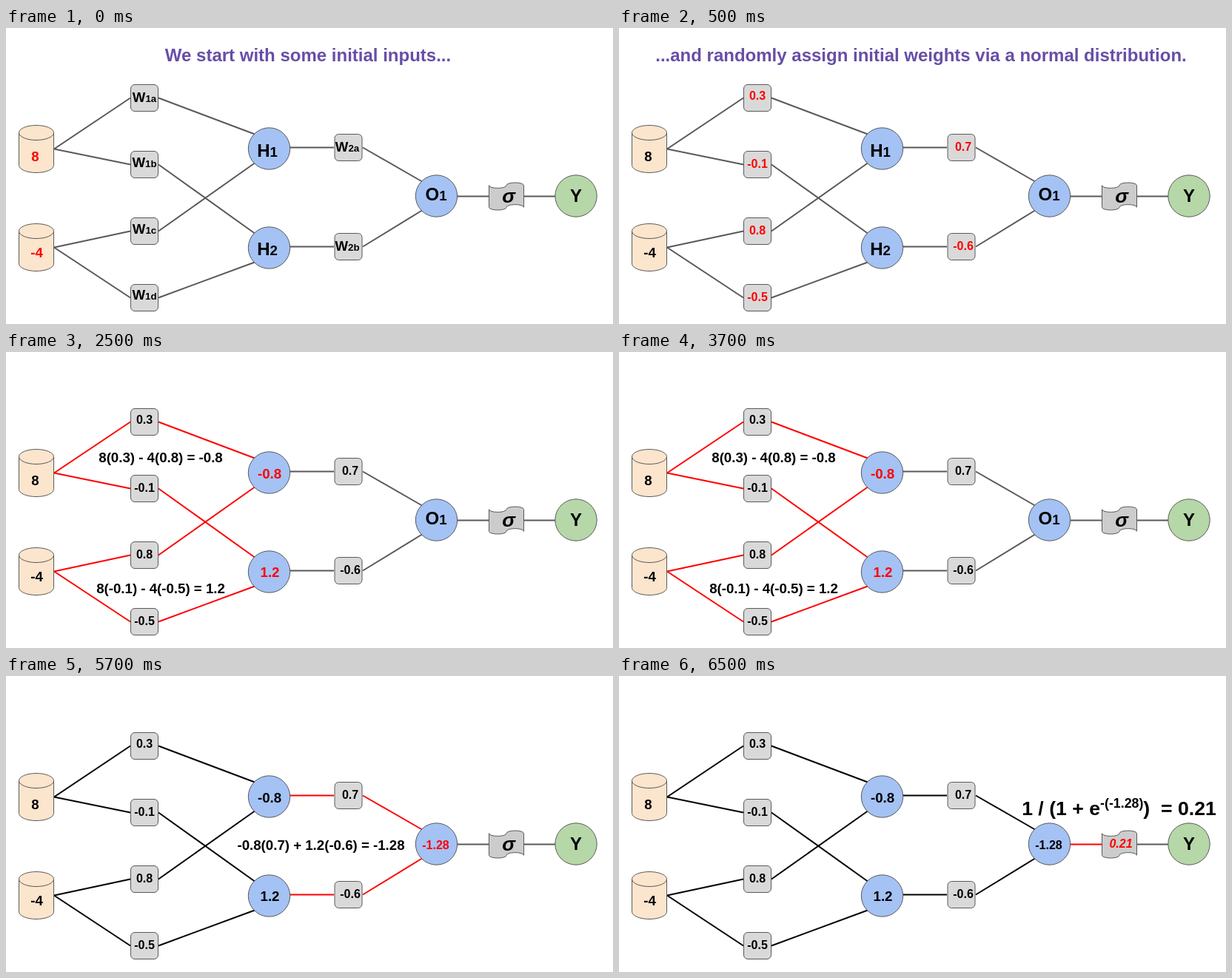
Animation of 820x400 px, one loop 8 s. Source, as an HTML page:

```html
<!DOCTYPE html>
<html lang="en">
<head>
<meta charset="utf-8">
<title>Forward pass</title>
<style>
  html, body { margin: 0; width: 100%; height: 100%; overflow: hidden; background: #fff; }
  svg { display: block; }
  text { font-family: "Liberation Sans", Arial, sans-serif; font-weight: bold; text-anchor: middle; white-space: pre; }
  .shape { stroke: #595959; stroke-width: 1; }
  .wire { fill: none; stroke-width: 2; }
</style>
</head>
<body>
<svg id="stage" width="820" height="400" viewBox="0 0 820 400"></svg>
<script>
const stage = document.getElementById("stage");
const STARTS = [0, 500, 2500, 4500, 6500], LOOP = 8000;
const GREY = "#595959", RED = "#ff0000", BLACK = "#000000";
const updates = [];

function add(tag, attrs, parent = stage) {
  const el = document.createElementNS("http://www.w3.org/2000/svg", tag);
  for (const k in attrs) el.setAttribute(k, attrs[k]);
  return parent.appendChild(el);
}

// A wire is red during its active step, black afterwards.
function wires(active, d) {
  const el = add("path", { class: "wire", d });
  updates.push(step => el.setAttribute("stroke",
    step < active ? GREY : step === active ? RED : BLACK));
}

const shape = (tag, fill, attrs) => add(tag, { class: "shape", fill, ...attrs });
const circle = (cx, cy, fill) => shape("circle", fill, { cx, cy, r: 28.2 });
const box = (cx, cy) =>
  shape("rect", "#d9d9d9", { x: cx - 18.5, y: cy - 18, width: 37, height: 36, rx: 5.5 });

function can(y) {
  shape("path", "#fce5cd", { d: `M17.5 ${y + 10}a23.5 10 0 0 1 47 0v44a23.5 10 0 0 1 -47 0z` });
  add("path", { class: "shape", fill: "none", d: `M17.5 ${y + 10}a23.5 10 0 0 0 47 0` });
}

// Text shown in steps from..to; parts are [string, size, dy] and it is red in step hot.
function label(x, y, parts, { from = 0, to = 4, hot = -1, color = BLACK, italic = false } = {}) {
  const el = add("text", { x, y, "font-style": italic ? "italic" : "normal" });
  for (const [str, size, dy = 0] of parts)
    add("tspan", { "font-size": size, dy }, el).textContent = str;
  updates.push(step => {
    el.setAttribute("display", step >= from && step <= to ? "inline" : "none");
    el.setAttribute("fill", step === hot ? RED : color);
  });
}

wires(2, "M168 94.5L65 163.5L168 184.5M168 274.5L65 296.5L168 364.5" +
  "M206 94.5L336 143.5M206 184.5L336 277.5M206 274.5L336 182.5M206 364.5L336 316.5");
wires(3, "M384 161.5H443M384 295.5H443M482 161.5L562 207.5M482 295.5L562 246.5");
wires(4, "M610 227.5H653");
wires(5, "M699 227.5H742");

can(131.5);
can(264.5);
circle(355.5, 163, "#a4c2f4");
circle(355.5, 297, "#a4c2f4");
circle(581.5, 227, "#a4c2f4");
circle(770, 227, "#b6d7a8");
shape("path", "#cccccc", { d: "M652.5 212.7a11.75 3.7 0 0 0 23.5 0a11.75 3.7 0 0 1 23.5 0" +
  "V242.3a11.75 3.7 0 0 0 -23.5 0a11.75 3.7 0 0 1 -23.5 0z" });

// Weights: box centre, name with its position, value with its position.
[
  [187, 94.5, "1a", 187, 100, "0.3", 187, 96.5],
  [187, 184.5, "1b", 187, 188, "-0.1", 187, 188.5],
  [187, 274.5, "1c", 187, 278, "0.8", 187, 278.5],
  [187, 364.5, "1d", 187, 367, "-0.5", 187, 368.5],
  [462.5, 161.5, "2a", 461, 167, "0.7", 465, 165.5],
  [462.5, 295.5, "2b", 461, 301, "-0.6", 465, 299.5]
].forEach(([cx, cy, name, nx, ny, value, vx, vy]) => {
  box(cx, cy);
  label(nx, ny, [["W", 18.67], [name, 13.33]], { to: 0 });
  label(vx, vy, [[value, 16]], { from: 1, hot: 1 });
});

label(408, 45, [["We start with some initial inputs...", 24]], { to: 0, color: "#674ea7" });
label(408, 45, [["...and randomly assign initial weights via a normal distribution.", 24]],
  { from: 1, to: 1, color: "#674ea7" });

label(39.5, 180, [["8", 18.67]], { hot: 0 });
label(41.5, 310, [["-4", 18.67]], { hot: 0 });
label(353, 173.5, [["H", 24], ["1", 18.67]], { to: 1 });
label(353, 307, [["H", 24], ["2", 18.67]], { to: 1 });
label(356, 170.5, [["-0.8", 18.67]], { from: 2, hot: 2 });
label(356.5, 304, [["1.2", 18.67]], { from: 2, hot: 2 });
label(581, 233, [["O", 24], ["1", 18.67]], { to: 2 });
label(580.5, 234, [["-1.28", 16]], { from: 3, hot: 3 });
label(679, 236, [["σ", 26.67]], { to: 3, italic: true });
label(678, 232, [["0.21", 16]], { from: 4, hot: 4, italic: true });
label(770, 234.5, [["Y", 24]]);

label(209, 148.5, [["8(0.3) - 4(0.8) = -0.8", 18.67]], { from: 2, to: 2 });
label(209, 326, [["8(-0.1) - 4(-0.5) = 1.2", 18.67]], { from: 2, to: 2 });
label(425.5, 235, [["-0.8(0.7) + 1.2(-0.6) = -1.28", 18.67]], { from: 3, to: 3 });
label(675.5, 188, [["1 / (1 + e", 26.67], ["-(-1.28)", 17.78, -10], [")  = 0.21", 26.67, 10]],
  { from: 4 });

let shown = -1;
const begin = performance.now();
function frame() {
  const t = (performance.now() - begin) % LOOP;
  const step = STARTS.filter(s => s <= t).length - 1;
  if (step !== shown) updates.forEach(update => update(step));
  shown = step;
  requestAnimationFrame(frame);
}
frame();
</script>
</body>
</html>
```
